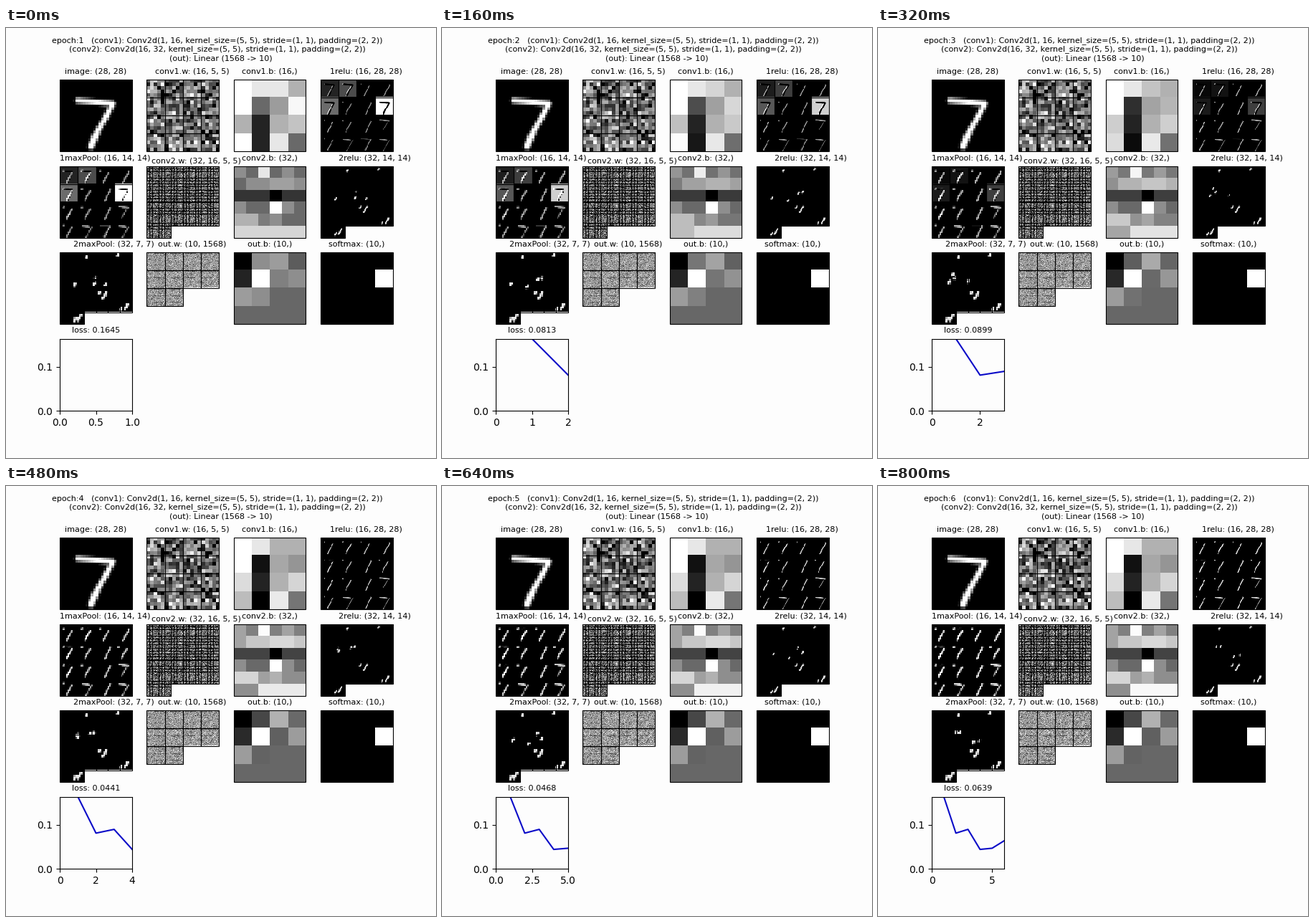
Write a matplotlib script that moves like this. It is 600 px wide and 600 px high and loops after 0.96 s.

```python
import numpy as np
import matplotlib.pyplot as plt
from matplotlib.animation import FuncAnimation
from matplotlib.patches import Rectangle

SIZE, DPI = 600, 100
PAPER = "#fdfdfd"
W, H = 465 / 4.6, 462 / 4.6
LOSS = [0.1645, 0.0813, 0.0899, 0.0441, 0.0468, 0.0639]
WHITE = 7.2

# Bias levels at the start and, where known, once training has settled
BIAS1 = ([8, 6.5, 6.5, 5, 8, 3, 4.4, 7, 5, 1, 5, 5.5, 8, 1, 6.5, 3],
         [8, 6.5, 5, 5, 7.6, 0.5, 4.7, 4.2, 6.2, 1, 5, 6, 5.3, 0, 6.6, 3.3])
BIAS_OUT = ([0, 4, 4.4, 2.6, 1, 8, 3.6, 4, 4.4, 4],
            [0, 2, 5, 3, 1.2, 8, 2.7, 4.4, 4.4, 2.8])
BIAS2 = [4, 3, 6.5, 3, 4, 3, 3, 4, 4, 4.5, 4.5, 4, 1.5, 1.5, 1.5, 0,
         1.5, 1.5, 4, 3, 3, 8, 4, 3, 5, 5, 3.5, 4, 3, 3, 6, 6]
ROW_DRIFT = [0.6, 1.6, 0.4, 0, 1, -2]

# First layer: edge direction of each map, and the maps with a lit background
ANGLES = [0, 20, 0, 180, 30, 0, 180, 0, 20, 0, 180, 90, 0, 270, 180, 270]
GLOW = {0: 0.14, 1: 0.3, 4: 0.42, 7: 1, 14: -0.5}

# Second layer: lasting strokes as x, y, length
STROKES = [(62, 61, 9), (92, 77, 8), (27, 92, 9), (37, 7, 2), (80, 5, 2),
           (55, 58, 3), (21, 95, 4), (85, 80, 3)]


def settle(pair, n):
    start, end = np.array(pair)
    return start + (end - start) * min(1, n / 3)


def montage(maps, cols):
    h, w = maps[0].shape
    sheet = np.zeros((h * cols, w * cols))
    for i, m in enumerate(maps):
        r, c = divmod(i, cols)
        sheet[r * h:(r + 1) * h, c * w:(c + 1) * w] = m
    return sheet


def pool(a):
    h, w = a.shape
    return a.reshape(h // 2, 2, w // 2, 2).max(axis=(1, 3))


def cut(sheet, cols, count):
    """Blank the cells after the last used one."""
    mask = np.arange(cols * cols).reshape(cols, cols) >= count
    step = sheet.shape[0] // cols
    return np.ma.array(sheet, mask=np.kron(mask, np.ones((step, step), bool)))


def segment_distance(x, y, p, q):
    dx, dy = q[0] - p[0], q[1] - p[1]
    t = np.clip(((x - p[0]) * dx + (y - p[1]) * dy) / (dx * dx + dy * dy), 0, 1)
    return np.hypot(x - p[0] - t * dx, y - p[1] - t * dy)


def make_digit():
    y, x = np.mgrid[:28, :28].astype(float)
    path = [(6.4, 7.9), (14, 8.5), (20, 9.1), (17.4, 14.2), (14, 20), (11.6, 25.6)]
    d = np.min([segment_distance(x, y, p, q) for p, q in zip(path, path[1:])], axis=0)
    return np.clip(1.5 + 0.25 * (y > 20) - d, 0, 1)


digit = make_digit()
edge_x = np.roll(digit, -1, 1) - np.roll(digit, 1, 1)
edge_y = np.roll(digit, -1, 0) - np.roll(digit, 1, 0)


def relu1(n):
    fade = max(0, 1 - (n / 2.3) ** 2)
    maps = []
    for k, angle in enumerate(np.radians(ANGLES)):
        glow = GLOW.get(k, 0) * fade
        edge = np.cos(angle) * edge_x + np.sin(angle) * edge_y
        lit = np.maximum((0.8 + 0.06 * n) * edge - 0.25, 0)
        maps.append(np.clip(glow * (1 - 1.5 * digit) + lit, 0, 1))
    return maps


def relu2(n):
    y, x = (np.mgrid[:84, :84] + 0.5) * 101 / 84
    dots = np.random.default_rng(n).uniform((20, 31, 2), (66, 50, 3), (4, 3))
    sheet = np.zeros((84, 84))
    for sx, sy, length in [*STROKES, *dots]:
        ux, uy = 0.25 * length, 0.43 * length
        d = segment_distance(x, y, (sx - ux, sy + uy), (sx + ux, sy - uy))
        sheet = np.maximum(sheet, np.clip(1.5 - d, 0, 0.9))
    return sheet


def noise(size, mean, spread, drift):
    rng = np.random.default_rng(size)
    base = rng.normal(mean, spread, (size, size))
    step = rng.normal(0, drift, (size, size))
    return lambda n: np.clip(base + n * step, 0, 1)


kernels = noise(20, 0.47, 0.25, 0.02)
fine = noise(144, 0.46, 0.22, 0.02)
dense = noise(160, 0.6, 0.14, 0.015)


def weights2(n):
    a = fine(n)
    a[::6] = a[:, ::6] = 0
    return cut(a, 6, 32)


def weights_out(n):
    a = dense(n)
    for row in (3, 17, 31):
        a[row::40, ::3] = 0.15
    return cut(a, 4, 10)


def bias2(n):
    cells = np.append(BIAS2, [6] * 4).reshape(6, 6)
    cells = cells + np.array(ROW_DRIFT)[:, None] * min(1, n / 3)
    cells[5, 2:] = 6 + 0.2 * n
    cells[2, 3] = 0
    return cells / WHITE


def bias_out(n):
    return np.append(settle(BIAS_OUT, n), [2.9] * 6).reshape(4, 4) / WHITE


softmax = np.zeros((4, 4))
softmax[1, 3] = 1


def panels(n):
    first, second = relu1(n), relu2(n)
    return [
        digit, kernels(n), settle(BIAS1, n).reshape(4, 4) / WHITE,
        montage(first, 4), montage([pool(m) for m in first], 4), weights2(n),
        bias2(n), cut(second, 6, 32), cut(pool(second), 6, 32), weights_out(n),
        bias_out(n), softmax,
    ]


# Title, its shift in pixels, then columns and count of framed cells
LAYOUT = [
    ("image: (28, 28)", 0, 0, 1, 1),
    ("conv1.w: (16, 5, 5)", 12.6, 0, 4, 16),
    ("conv1.b: (16,)", 0, 0, 1, 1),
    ("1relu: (16, 28, 28)", 12.6, 0, 4, 16),
    ("1maxPool: (16, 14, 14)", 12.6, 0, 4, 16),
    ("conv2.w: (32, 16, 5, 5)", 18.5, 4, 6, 32),
    ("conv2.b: (32,)", 0, 0, 1, 1),
    ("2relu: (32, 14, 14)", 25.3, 0, 6, 32),
    ("2maxPool: (32, 7, 7)", 25.3, 0, 6, 32),
    ("out.w: (10, 1568)", 12.6, 0, 4, 10),
    ("out.b: (10,)", 0, 0, 1, 1),
    ("softmax: (10,)", 0, 0, 1, 1),
    ("loss", 0, 0, 1, 1),
]

plt.rcParams["font.family"] = "DejaVu Sans"
fig = plt.figure(figsize=(SIZE / DPI, SIZE / DPI), dpi=DPI, facecolor=PAPER)
grays = plt.get_cmap("gray").copy()
grays.set_bad(PAPER)


def add_panel(i, width=W):
    r, c = divmod(i, 4)
    left, top = 75 + 1.2 * W * c, 72 + 1.2 * H * r
    ax = fig.add_axes([(left + (W - width) / 2) / SIZE, 1 - (top + H) / SIZE,
                       width / SIZE, H / SIZE], facecolor=PAPER)
    text, dx, dy = LAYOUT[i][:3]
    label = fig.text((left + W / 2 + dx) / SIZE, 1 - (top - 8.3 + dy) / SIZE, text,
                     fontsize=8, ha="center", va="baseline")
    return ax, label


def frame_cells(ax, cols, count):
    for k in range(count):
        r, c = divmod(k, cols)
        ax.add_patch(Rectangle((c / cols, 1 - (r + 1) / cols), 1 / cols, 1 / cols,
                               transform=ax.transAxes, fill=False, ec="black",
                               lw=0.8, clip_on=False))


images = []
for i, data in enumerate(panels(0)):
    cols, count = LAYOUT[i][3:]
    ax, _ = add_panel(i, H if cols == 1 else W)
    images.append(ax.imshow(data, cmap=grays, vmin=0, vmax=1, aspect="auto",
                            interpolation="nearest"))
    ax.axis("off")
    frame_cells(ax, cols, count)

chart, loss_label = add_panel(12)
chart.set_ylim(0, LOSS[0])
line, = chart.plot([], [], color="#0b0bc8", lw=1.5)
heading = fig.suptitle("", fontsize=8)


def update(n):
    for image, data in zip(images, panels(n)):
        image.set_data(data)
    heading.set_text(
        f"epoch:{n + 1}   (conv1): Conv2d(1, 16, kernel_size=(5, 5), "
        "stride=(1, 1), padding=(2, 2))   \n"
        "(conv2): Conv2d(16, 32, kernel_size=(5, 5), stride=(1, 1), "
        "padding=(2, 2))   \n(out): Linear (1568 -> 10)")
    loss_label.set_text(f"loss: {LOSS[n]:.4f}")
    line.set_data(range(1, n + 2), LOSS[:n + 1])
    chart.set_xlim(0, n + 1)
    return [*images, heading, loss_label, line]


anim = FuncAnimation(fig, update, frames=6, interval=160, repeat=True,
                     repeat_delay=0, blit=False)
plt.show()
```
